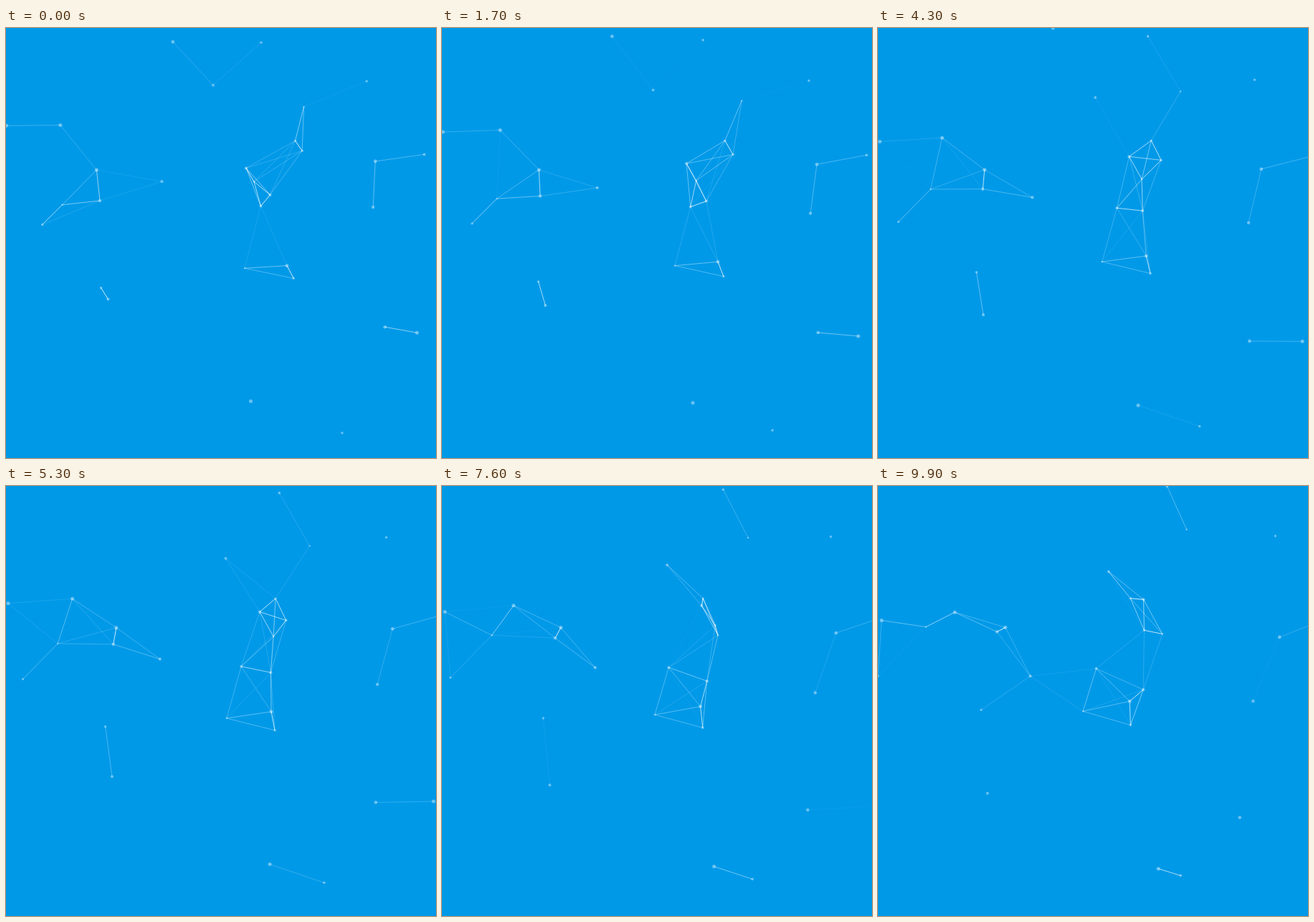
An HTML page with a canvas that plays this animation: 600x600 px, repeating every 10000 ms.

```html
<!DOCTYPE html>
<html lang="en">
<head>
<meta charset="utf-8">
<title>Drifting network</title>
<style>
  html, body { margin: 0; width: 100%; height: 100%; overflow: hidden; background: #0099e8; }
  canvas { display: block; width: 600px; height: 600px; }
</style>
</head>
<body>
<canvas id="stage" width="600" height="600"></canvas>
<script>
const ctx = document.getElementById('stage').getContext('2d');
const LOOP = 10000, STEP = 100, REACH = 100;
const SPEED = 0.00519; // pixels per ms, shared by all dots

// x, y, heading in degrees, radius
const dots = [
  [232.8, 19.3, -59.2, 2.4],
  [356, 20.3, -22.8, 1.8],
  [289, 79.8, 50.4, 1.9],
  [503.2, 74.2, -5, 1.7],
  [415.6, 109.9, -72.9, 1.2],
  [403.6, 157.3, 180.6, 1.6],
  [413.2, 171.4, 144.4, 1.7],
  [335, 195.5, -46.2, 2.1],
  [346, 214.3, -8.8, 1.3],
  [368.5, 232.8, 88.1, 2.1],
  [355.5, 248.5, 173.1, 1.9],
  [333, 335.2, 203.9, 1.2],
  [392, 331.6, 217.4, 2.4],
  [401.3, 349.3, 197.8, 1.7],
  [0.6, 136.3, 85.1, 2.5],
  [75.8, 135.5, 52.4, 2.5],
  [126.4, 198, -0.7, 2.5],
  [131, 241, -47, 2.2],
  [78.5, 246.7, 256.9, 1.2],
  [50.6, 274.4, 190.3, 1.6],
  [217.5, 214.2, 95.5, 2.1],
  [515.3, 186, 29, 2.4],
  [583.7, 176.4, 5.9, 1.9],
  [512.2, 250, 77.4, 2.2],
  [132.5, 362.5, -77.2, 1.7],
  [142.5, 378.5, 78.5, 2],
  [528.8, 417.2, 117.9, 2.3],
  [573.5, 425.2, 32.8, 2.5],
  [341.5, 520.8, 14.9, 2.5],
  [469, 565, 204.6, 1.8]
];

function link(a, b) {
  const d = Math.hypot(a.x - b.x, a.y - b.y);
  if (d >= REACH) return;
  ctx.strokeStyle = `rgba(255,255,255,${1 - d / REACH})`;
  ctx.beginPath();
  ctx.moveTo(a.x, a.y);
  ctx.lineTo(b.x, b.y);
  ctx.stroke();
}

function draw(time) {
  const way = Math.floor(time % LOOP / STEP) * STEP * SPEED;
  const points = dots.map(([x, y, heading, r]) => {
    const a = heading * Math.PI / 180;
    return { x: x + way * Math.cos(a), y: y + way * Math.sin(a), r };
  });

  ctx.fillStyle = '#0099e8';
  ctx.fillRect(0, 0, 600, 600);
  ctx.lineWidth = 1;
  points.forEach((a, i) => points.slice(i + 1).forEach(b => link(a, b)));

  ctx.fillStyle = 'rgba(255,255,255,0.4)';
  for (const { x, y, r } of points) {
    ctx.beginPath();
    ctx.arc(x, y, r, 0, Math.PI * 2);
    ctx.fill();
  }
}

let start;
function tick(now) {
  start ??= now;
  draw(now - start);
  requestAnimationFrame(tick);
}
draw(0);
requestAnimationFrame(tick);
</script>
</body>
</html>
```
